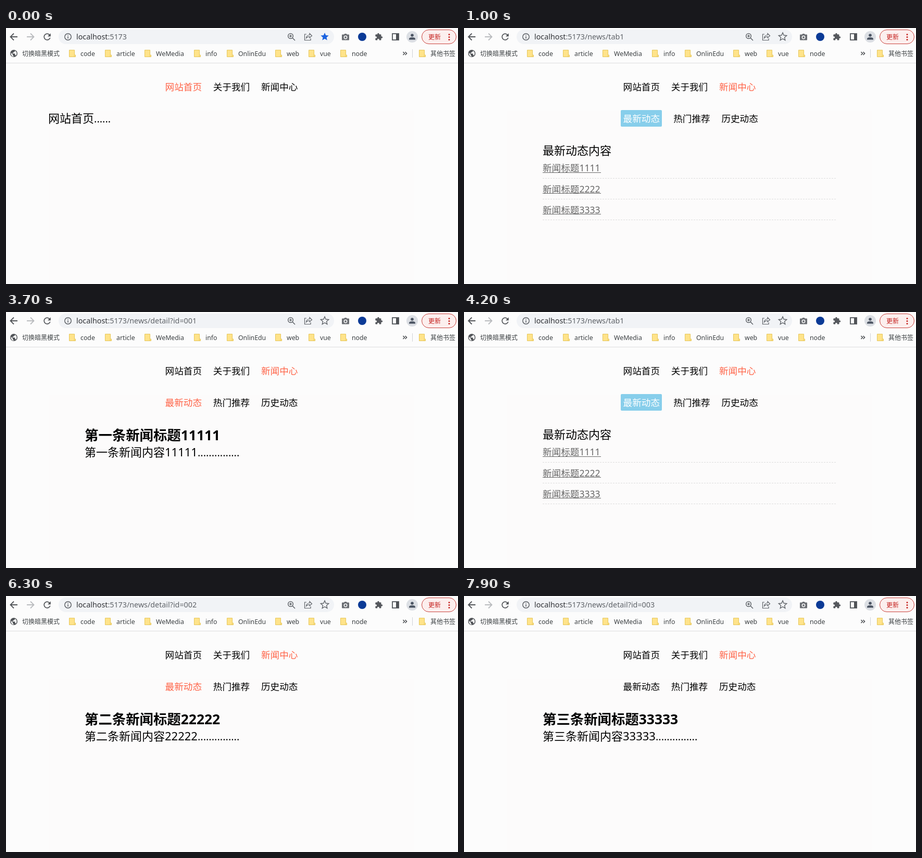
An HTML page for the animation above (8000 ms loop, 868x493 px).

```html
<!DOCTYPE html>
<html lang="zh-CN">
<head>
<meta charset="utf-8">
<title>News tabs</title>
<style>
  html, body { margin: 0; width: 100%; height: 100%; overflow: hidden; background: #fcfcfc; }
  svg { display: block; width: 868px; height: 493px; }
  text { font-family: "Noto Sans", "Noto Sans CJK SC", sans-serif; white-space: pre; }
  .line { fill: none; stroke: #5f6368; stroke-width: 1.5; }
</style>
</head>
<body>
<svg viewBox="0 0 868 493">
  <rect width="868" height="493" fill="#fcfcfc"/>
  <rect x="82" y="160" width="702" height="333" fill="#fcfbfb"/>
  <rect y="67" width="868" height="1" fill="#dcdcde"/>

  <!-- toolbar -->
  <rect x="101" y="3" width="529" height="28" rx="14" fill="#f1f3f6"/>
  <path class="line" d="M22 17H9M15 10.5L8.5 17L15 23.500" style="stroke:#505357;stroke-width:1.8"/>
  <path class="line" d="M40 17H53M47 10.500L53.500 17L47 23.500" style="stroke:#b9bbbe;stroke-width:1.8"/>
  <path transform="translate(69 7) scale(.84)" fill="#505357" d="M17.650 6.350C16.200 4.900 14.210 4 12 4c-4.420 0-7.990 3.580-7.990 8s3.570 8 7.990 8c3.730 0 6.840-2.550 7.730-6h-2.080c-.820 2.330-3.040 4-5.650 4-3.310 0-6-2.690-6-6s2.690-6 6-6c1.660 0 3.140.690 4.220 1.780L13 11h7V4z"/>
  <circle class="line" cx="119" cy="17" r="6.200"/>
  <path class="line" d="M119 16V20.500M119 13V14.500"/>
  <g class="line">
    <circle cx="546.500" cy="15.500" r="4.800"/>
    <path d="M550 19L555 24M544 15.500H549M546.500 13V18"/>
    <path stroke-width="1.200" d="M577 12H573.500V23.500H585V20M576.500 19.500C577 15.500 579.500 13.500 583 13.500V10.500L587.500 15L583 19V16.500C580 16.500 578 17.500 576.500 19.500Z"/>
  </g>
  <path id="star" transform="translate(602.800 7.400) scale(.77)" stroke-width="1.800" d="M12 17.270L18.180 21l-1.640-7.030L22 9.240l-7.190-.610L12 2 9.190 8.630 2 9.240l5.460 4.730L5.820 21z"/>
  <path fill="#6b6e73" d="M646 12.500H649L650.500 11H653.500L655 12.500H658Q659 12.500 659 13.500V22.500Q659 23.500 658 23.500H646Q645 23.500 645 22.500V13.500Q645 12.500 646 12.500Z"/>
  <circle cx="652" cy="18" r="2.700" fill="#6b6e73" stroke="#fcfcfc" stroke-width="1.500"/>
  <circle cx="684" cy="17" r="8" fill="#0b3a96"/>
  <path transform="translate(708 9) scale(.66)" fill="#55585d" d="M20.500 11H19V7c0-1.100-.900-2-2-2h-4V3.500C13 2.120 11.880 1 10.500 1S8 2.120 8 3.500V5H4c-1.100 0-2 .900-2 2v3.800h1.500c1.490 0 2.700 1.210 2.700 2.700s-1.210 2.700-2.700 2.700H2V20c0 1.100.900 2 2 2h3.800v-1.500c0-1.490 1.210-2.700 2.700-2.700s2.700 1.210 2.700 2.700V22H17c1.100 0 2-.900 2-2v-4h1.500c1.380 0 2.500-1.120 2.500-2.500S21.880 11 20.500 11z"/>
  <rect class="line" x="742" y="11" width="12" height="12" style="stroke-width:2"/>
  <rect x="749" y="11" width="5" height="12" fill="#505357"/>
  <circle cx="780" cy="17" r="11" fill="#dcdfe4"/>
  <circle cx="780" cy="14" r="2.800" fill="#4c5563"/>
  <path fill="#4c5563" d="M774 22.500V21Q774 18 780 18T786 21V22.500Z"/>
  <rect x="798.500" y="3.500" width="66" height="27" rx="13.500" fill="#fcefee" stroke="#c9403b"/>
  <g fill="#c5221f">
    <text x="811" y="21.600" font-size="12">更新</text>
    <circle cx="851" cy="12.500" r="1.500"/><circle cx="851" cy="17.500" r="1.500"/><circle cx="851" cy="22.500" r="1.500"/>
  </g>

  <!-- bookmarks bar -->
  <circle cx="15" cy="49" r="7" fill="#505357"/>
  <path fill="#fcfcfc" d="M9.500 47.500L13 51V52.500L14.500 54V55.300Q9.500 54 9.500 49ZM17 43.800Q20.500 45.500 20.500 49Q20.500 51.500 19 53L17.500 52V50L16.500 49.200H12.500V47.700H14.500V46H16.500Z"/>
  <path class="line" d="M762.500 46L765.500 49L762.500 52M766.500 46L769.500 49L766.500 52" style="stroke:#45484c"/>
  <rect x="780" y="41" width="1" height="16" fill="#d0d2d5"/>
  <g id="bookmarks"></g>

  <g id="address" font-size="14.300"></g>
  <g id="page"></g>
</svg>

<script>
const byId = id => document.getElementById(id);
const LOOP = 8000, ACCENT = '#ff6347', BODY_SIZE = 17.6;

const text = (x, y, size, content, fill = '#000', extra = '') =>
  `<text x="${x}" y="${y}" font-size="${size}" fill="${fill}" ${extra}>${content}</text>`;
const dots = count => `<tspan font-size="20">${'.'.repeat(count)}</tspan>`;

const folder = x =>
  `<path d="M${x + .5} 42.500h10v9.500h2v3.500h-12z" fill="#ffe38a" stroke="#e6c65a"/>
   <path d="M${x + 10} 52.500v3" stroke="#e6c65a"/>`;
const bookmark = (x, label, size = 12.3) => folder(x) + text(x + 22, 54, size, label, '#3c4043');

byId('bookmarks').innerHTML =
  text(31, 53.600, 12, '切换暗黑模式', '#3c4043') +
  [[121, 'code'], [190, 'article'], [266, 'WeMedia'], [361, 'info'], [424, 'OnlinEdu'],
   [517, 'web'], [581, 'vue'], [642, 'node']].map(([x, label]) => bookmark(x, label)).join('') +
  bookmark(793, '其他书签', 12);

const menu = (labels, y, colorOf, xOf = i => 305.6 + 92.2 * i) =>
  labels.map((label, i) => text(xOf(i), y, BODY_SIZE, label, colorOf(i))).join('');

const navigation = active =>
  menu(['网站首页', '关于我们', '新闻中心'], 120.4, i => active.includes(i) ? ACCENT : '#000');

const tabs = (selected, hovered) =>
  (selected ? '<rect x="301" y="158" width="79" height="32" rx="2" fill="#87ceeb"/>' : '') +
  menu(['最新动态', '执门推荐'.replace('执', selected ? '热' : '热'), '历史动态'], 181.4,
    i => i ? '#000' : selected ? '#fff' : hovered ? ACCENT : '#000',
    i => 305.6 + 92.2 * i + (selected && i ? 4.4 : 0));

const newsList = () =>
  text(151, 244, 22, '最新动态内容') +
  [1, 2, 3].map(n => {
    const y = 235.7 + 40.4 * n;
    const rule = Math.floor(y + 13) + .5;
    return text(151, y, BODY_SIZE, '新闻标题' + String(n).repeat(4), '#666') +
      `<path d="M151 ${Math.floor(y + 2) + .5}h112" stroke="#666"/>
       <path d="M151 ${rule}h564" stroke="#dcdcdc" stroke-dasharray="3 2"/>`;
  }).join('');

const article = n => {
  const ordinal = `第${'一二三'[n - 1]}条新闻`, digits = String(n).repeat(5);
  return text(151, 247, 26.4, `${ordinal}标题${digits}`, '#000', 'font-weight="700"') +
    text(151, 277.500, 22, `${ordinal}内容${digits}${dots(15)}`);
};

const home = hovered => ({
  path: '', starred: true,
  page: navigation(hovered ? [0, 2] : [0]) + text(81, 182, 22, '网站首页' + dots(6))
});
const list = loaded => ({
  path: '/news/tab1',
  page: navigation([2]) + tabs(true) + (loaded ? newsList() : '')
});
const detail = (n, loaded, hovered) => ({
  path: '/news/detail?id=00' + n,
  page: navigation([2]) + tabs(false, hovered) + (loaded ? article(n) : '')
});

const timeline = [
  [0, home(false)], [600, home(true)], [1000, list(true)],
  [2800, detail(1, false)], [2900, detail(1, true)], [3700, detail(1, true, true)],
  [4100, list(false)], [4200, list(true)],
  [5200, detail(2, false)], [5300, detail(2, true)], [6300, detail(2, true, true)],
  [6700, list(false)], [6800, list(true)],
  [7900, detail(3, true)]
];

function show({ path, starred, page }) {
  byId('address').innerHTML =
    `<text x="135" y="22" fill="#5f6368"><tspan fill="#303236">localhost</tspan>:5173${path}</text>`;
  byId('star').setAttribute('fill', starred ? '#1a62e0' : 'none');
  byId('star').setAttribute('stroke', starred ? 'none' : '#5f6368');
  byId('page').innerHTML = page;
}

let current;
function frame() {
  const time = performance.now() % LOOP;
  const scene = timeline.findLast(([start]) => start <= time)[1];
  if (scene !== current) show(current = scene);
  requestAnimationFrame(frame);
}
frame();
</script>
</body>
</html>
```
